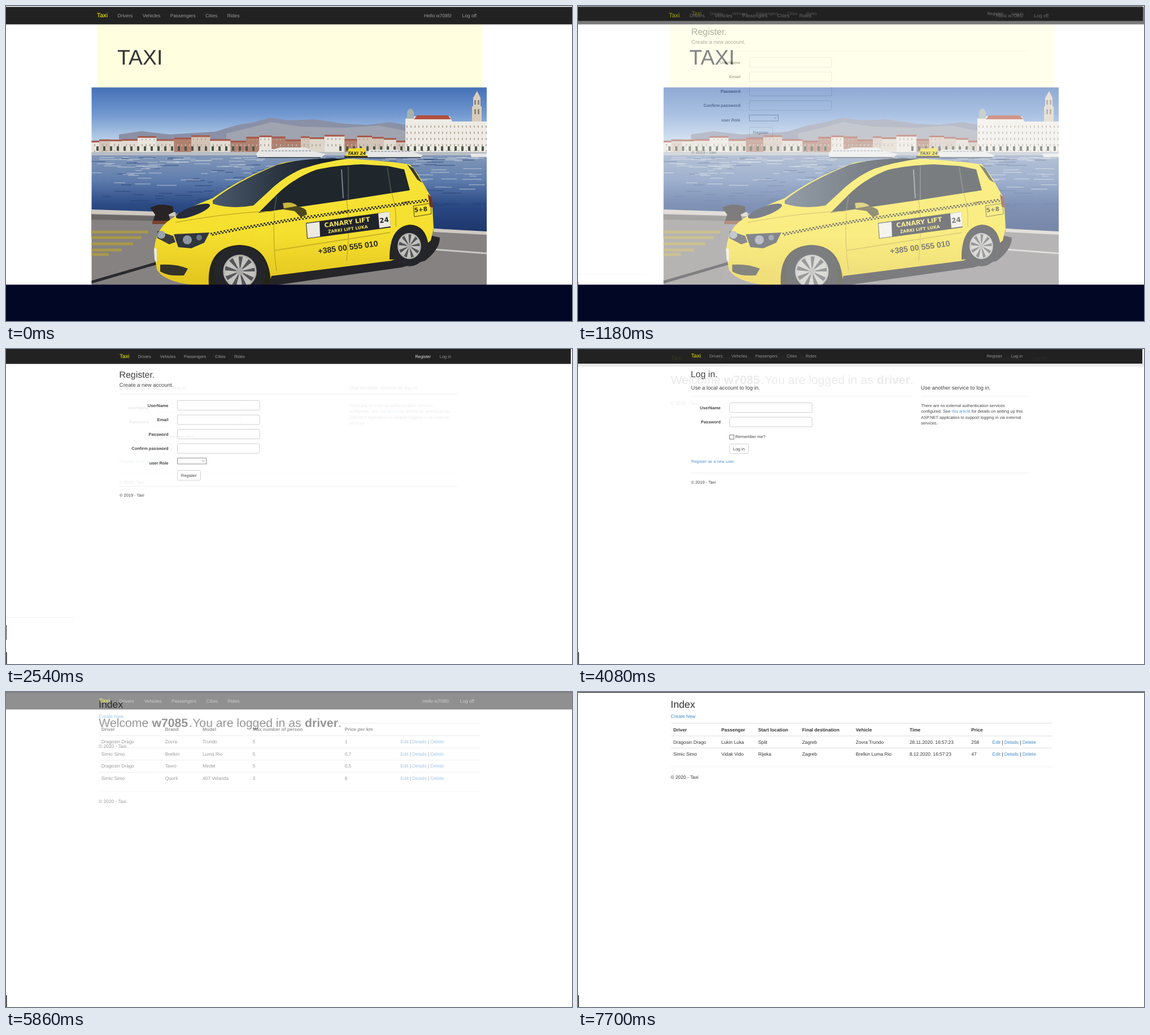
These frames come from a looping animation (1002x559 px, 8000 ms). An HTML page:

```html
<!DOCTYPE html>
<html lang="en">
<head>
<meta charset="utf-8">
<title>Taxi</title>
<style>
  html, body { margin: 0; width: 100%; height: 100%; overflow: hidden; background: #fff; }
  svg { display: block; width: 1002px; height: 559px; }
  text { font-family: "Liberation Sans", Arial, sans-serif; fill: #333; text-rendering: geometricPrecision; white-space: pre; }
  .b { font-weight: bold; }
  .r { text-anchor: end; }
  .brand { fill: #ff0; }
  .nav { fill: #9d9d9d; }
  .on { fill: #eee; }
  .link { fill: #428bca; }
  .sign text { font-family: "DejaVu Sans", sans-serif; font-weight: bold; }
  .field { fill: #fff; stroke: #ccc; }

  /* each page dissolves in over the one before, ten steps of 60 ms */
  .page, #band { animation: 8s -.5ms infinite; }
  #register { animation-name: register; }
  #login { animation-name: login; }
  #welcome { animation-name: welcome; }
  #vehicles { animation-name: vehicles; }
  #rides { animation-name: rides; }
  #band { animation-name: band; animation-timing-function: step-end; }
  @keyframes register { 0% { opacity: 0 } 12.5% { opacity: 0; animation-timing-function: steps(10, start) } 20%, 100% { opacity: 1 } }
  @keyframes login { 0% { opacity: 0 } 31.75% { opacity: 0; animation-timing-function: steps(10, start) } 39.25%, 100% { opacity: 1 } }
  @keyframes welcome { 0% { opacity: 0 } 51% { opacity: 0; animation-timing-function: steps(10, start) } 58.5%, 100% { opacity: 1 } }
  @keyframes vehicles { 0% { opacity: 0 } 70.25% { opacity: 0; animation-timing-function: steps(10, start) } 77.75%, 100% { opacity: 1 } }
  @keyframes rides { 0% { opacity: 0 } 89.5% { opacity: 0; animation-timing-function: steps(10, start) } 97%, 100% { opacity: 1 } }
  @keyframes band { 0% { opacity: 1 } 19.25%, 100% { opacity: 0 } }
</style>
</head>
<body>
<svg viewBox="0 0 1002 559">
  <defs>
    <linearGradient id="sky" x2="0" y2="1"><stop stop-color="#4570b6"/><stop offset=".4" stop-color="#7198d0"/><stop offset=".75" stop-color="#b3cbe6"/></linearGradient>
    <linearGradient id="sea" x2="0" y2="1"><stop stop-color="#8398b8"/><stop offset=".3" stop-color="#5f7dad"/><stop offset=".6" stop-color="#2c4a85"/><stop offset="1" stop-color="#1a3268"/></linearGradient>
    <linearGradient id="paint" x2="0" y2="1"><stop stop-color="#f7e43a"/><stop offset=".6" stop-color="#f5df2e"/><stop offset="1" stop-color="#e2c41e"/></linearGradient>
    <linearGradient id="glass"><stop stop-color="#4a5a6c"/><stop offset=".5" stop-color="#2a3440"/><stop offset="1" stop-color="#10161f"/></linearGradient>
    <pattern id="panes" width="7" height="11" patternUnits="userSpaceOnUse"><path d="M2 3h2v4h-2z" fill="#b5ada0"/></pattern>
    <clipPath id="frame"><path d="M151.500 144.500H851V495H151.500z"/></clipPath>
    <g id="wheel">
      <circle r="46" fill="#25262a"/>
      <circle r="30" fill="#55565a"/>
      <circle r="28" fill="none" stroke="#b3b2ad" stroke-width="3"/>
      <circle r="16" fill="none" stroke="#c3c2bd" stroke-width="22" stroke-dasharray="6.500 4.671"/>
      <circle r="7" fill="#a5a5a3"/>
    </g>
  </defs>

  <g id="home">
    <path d="M0 0H1002V559H0z" fill="#fff"/>
    <path d="M161 32H843.500V146H161z" fill="#ffffe0"/>
    <g id="homeText"></g>
    <g clip-path="url(#frame)">
      <path d="M151 144H851V265H151z" fill="url(#sky)"/>
      <path d="M200 228 240 222 290 228 370 223 410 211 440 206 468 198 500 203 545 201 600 209 640 211 680 206 720 213V250H200z" fill="#8a90a6"/>
      <path d="M390 226 440 214 470 206 520 214 600 216 660 212 710 222V245H390z" fill="#a0a4b0"/>
      <g id="town"></g>
      <path d="M707 200 722 196H786L790 205H851V263H707z" fill="#eeebe5"/>
      <path d="M708 206H851V258H708z" fill="url(#panes)"/>
      <path d="M722 201 728 194H782L788 201z" fill="#b2503f"/>
      <path d="M710 200V188Q716 176 722 188V200z" fill="#a4b3ad"/>
      <path d="M825 205V178H827V163L834 151 840 163V178H842V205z" fill="#d8cdbc"/>
      <path d="M829 167h3v8h-3zM835 167h3v8h-3zM829 183h3v9h-3zM835 183h3v9h-3z" fill="#8f8577"/>
      <path d="M151 259H851V266H151z" fill="#b9bec4"/>
      <path d="M160 253H440M590 253H850" stroke="#4c5548" stroke-width="8" stroke-dasharray="4 8"/>
      <path d="M151 265H851V410H151z" fill="url(#sea)"/>
      <g id="ripples"></g>
      <path d="M443 262 450 254H475L485 251H530L545 258 566 263 556 270H446zM636 263 645 255H690L722 259 738 265 732 270H638zM822 262H851V268H824z" fill="#e6e7e6"/>
      <path d="M452 257H540M646 258H715" stroke="#929aa2" stroke-width="1.500" stroke-dasharray="4 2"/>
      <path d="M446 269H557M638 269H734" stroke="#4d5866" stroke-width="2"/>

      <path d="M151 363 300 368 700 390 851 402V495H151z" fill="#858281"/>
      <path d="M151 361 300 366V373L151 369zM757 395 851 400V406L757 401z" fill="#cfc9c0"/>
      <path d="M151 370 290 374V382L151 379z" fill="#6b6867"/>
      <path d="M760 432 851 439" stroke="#c9c7c4" stroke-width="3"/>
      <path d="M151 401H252M151 411H240M151 422H225M151 433H205M151 441H182" stroke="#a9984a" stroke-width="5"/>
      <path d="M151 490 268 456" stroke="#2a2a30" stroke-width="5"/>
      <path d="M255 358Q273 348 296 356V366L288 370 292 386H259L264 370z" fill="#282425"/>
      <path d="M259 381H292V387H259z" fill="#7a432c"/>
      <path d="M455 495V470L690 440 742 405 768 411Q768 432 742 452L700 464 480 495z" fill="#252529"/>

      <path d="M267 468 262 436Q264 402 284 384 315 360 366 341 420 302 490 278 590 263 714 281 724 288 741 319L754 342 757 394 752 416 740 426 682 452 470 479 464 495H330Q280 489 267 468z" fill="url(#paint)"/>
      <path d="M366 345Q405 313 480 282 530 268 604 271 560 277 524 289 490 304 464 330L438 354Q400 361 366 351z" fill="url(#glass)"/>
      <path d="M447 367 478 336Q508 306 548 291 580 283 630 281L676 284 705 290 715 327 606 344 530 355z" fill="#1f262c"/>
      <path d="M594 290 597 341" stroke="#7b828a" stroke-width="2"/>
      <path d="M606 285V343M675 286 682 331M479 338 475 363" stroke="#454e48" stroke-width="2"/>
      <path d="M710 281 721 288 737 314 728 308z" fill="#39382e"/>
      <path d="M475 367Q472 425 479 470M603 344Q610 390 603 452M683 333Q692 360 690 392M300 384Q400 366 475 364" fill="none" stroke="#b09a20"/>
      <path d="M475 434 680 402" stroke="#cbb225" stroke-width="2"/>
      <path d="M490 357Q520 352 531 362L533 370 522 375 511 364 491 361z" fill="#4b4620"/>
      <path d="M490 350Q508 346 516 355L492 359z" fill="#c9b73a"/>
      <path d="M588 368 607 363M700 350 715 347" stroke="#8d7c1e" stroke-width="3"/>
      <ellipse cx="331" cy="364" rx="32" ry="8" transform="rotate(-20 331 364)" fill="#252b3c"/>
      <g fill="none" stroke="#29281f" stroke-width="2.500" stroke-dasharray="3">
        <path d="M362 404Q470 382 600 364T747 343"/>
        <path d="M362 407Q470 385 600 367T747 346" stroke-dashoffset="3"/>
      </g>
      <path d="M297 405 360 402 351 420 328 430 305 428z" fill="#30363e"/>
      <circle cx="321" cy="415" r="8" fill="#8e979f"/><circle cx="342" cy="411" r="5" fill="#6c7680"/>
      <path d="M268 399 296 408 300 419 289 423 268 412z" fill="#3b3c3c"/>
      <circle cx="275" cy="406" r="7" fill="#99a3ad"/>
      <path d="M273 459Q300 457 322 466L315 478Q286 480 273 471z" fill="#343329"/>
      <path d="M262 430 267 431 267 455 263 450z" fill="#e8e8e3"/>
      <path d="M747 334 754 340 756 358 750 356z" fill="#782e24"/>
      <path d="M359 495Q355 428 412 424 461 424 468 480V495zM679 450Q678 392 715 388 744 389 748 426L742 446z" fill="#252419"/>
      <use href="#wheel" transform="translate(414 471)"/>
      <use href="#wheel" transform="translate(714 426) scale(.7 .78)"/>

      <path d="M601 266 607 253 634 252 639 267z" fill="#f0d92a"/>
      <path d="M599 266H640V270H599z" fill="#39382c"/>
      <g class="sign">
        <path d="M531 385 679 365 681 393 533 413z" fill="#20232a"/>
        <path d="M532 386 555 383 556 409 534 412zM659 368 679 365 681 391 661 394z" fill="#eceae2"/>
        <g transform="translate(564 393) rotate(-7.500)">
          <text font-size="11.200" style="fill:#f3e25c">CANARY LIFT</text>
          <text x="5" y="11" font-size="7.500" style="fill:#f3e25c">ŽARKI LIFT LUKA</text>
          <text x="98" y="5" font-size="12" style="fill:#222">24</text>
        </g>
        <path d="M721 355 752 350 753 369 723 374z" fill="none" stroke="#4d451a"/>
        <text x="723" y="366" font-size="10.500" transform="rotate(-6 723 366)" style="fill:#2c2919">5+8</text>
        <text x="605" y="264" font-size="7.500" font-style="italic" style="fill:#222">TAXI 24</text>
      </g>
      <text class="b" transform="translate(553 440) rotate(-7.500)" font-size="14.200" style="fill:#29281f">+385 00 555 010</text>
    </g>
  </g>
  <g class="page" id="register"></g>
  <g class="page" id="login"></g>
  <g class="page" id="welcome"></g>
  <g class="page" id="vehicles"></g>
  <g class="page" id="rides"></g>
  <path id="band" d="M0 494.500H1002V559H0z" fill="#020725"/>
</svg>
<script>
  const put = (id, ...parts) => document.getElementById(id).innerHTML = parts.flat().join('');
  const text = (x, y, size, str, cls = '') => `<text x="${x}" y="${y}" font-size="${size}" class="${cls}">${str}</text>`;
  const box = (x, y, w, h, attrs) => `<rect x="${x}" y="${y}" width="${w}" height="${h}" ${attrs}/>`;
  const fill = (x, y, w, h, color) => box(x, y, w, h, `fill="${color}"`);
  const rule = (x, y, w, color = '#eee') => fill(x, y, w, 1, color);
  const field = (x, y, w, h) => box(x, y, w, h, 'rx="2" class="field"');
  const blank = fill(0, 0, 1002, 559, '#fff');
  const tick = fill(0, 538, 1.5, 21, '#222');

  const MENU = ['Drivers', 'Vehicles', 'Passengers', 'Cities', 'Rides'];
  const HELLO = 'Hello w7085!';
  const nav = (bar, base, size, brandX, xs, right) => [
    fill(0, ...bar, '#222'),
    text(brandX, base + .3, size * 18 / 14, 'Taxi', 'brand'),
    MENU.map((m, i) => text(xs[i], base, size, m, 'nav')),
    right.map(([x, str, cls = 'nav']) => text(x, base, size, str, cls))
  ].flat();

  // seeded noise for the waterfront
  let seed = 7;
  const rnd = () => (seed = seed * 16807 % 2147483647) / 2147483647;
  const town = [];
  for (let x = 151; x < 707;) {
    const w = 14 + rnd() * 24, top = 229 + rnd() * 12;
    town.push(fill(x, top, w, 262 - top, ['#ddd5c9', '#e9e4dc', '#d3c4b8', '#e2dcd3', '#b0806f'][rnd() * 5 | 0]),
      fill(x, top - 1, w, 3, '#a6594b'),
      fill(x + 2, top + 4, w - 4, 16, 'url(#panes)'));
    x += w;
  }
  put('town', town);
  const ripples = [];
  for (let i = 0; i < 240; i++) {
    const y = 268 + rnd() * rnd() * 110, pale = y < 325 && rnd() < .7;
    ripples.push(box(145 + rnd() * 690, y, 10 + rnd() * 28, 1.5, `fill="${pale ? '#cdd3da' : '#243f74'}" opacity=".55"`));
  }
  put('ripples', ripples);

  put('homeText',
    nav([1.5, 1002, 31.1], 19.5, 8.45, 160.8, [197.5, 241.8, 290.8, 353, 391.8], [[740, HELLO], [807.5, 'Log off']]),
    text(197, 104, 37.4, 'TAXI'));

  const S = 7.43, H2 = 15.9, H4 = 9.55;
  put('register', blank,
    nav([0, 1000, 26.5], 15.8, S, 201.3, [233.5, 272.8, 315, 370.2, 404], [[724.5, 'Register', 'on'], [767.8, 'Log in']]),
    text(200.5, 51, H2, 'Register.'),
    text(200.8, 67, H4, 'Create a new account.'),
    rule(201, 79.5, 598),
    ['UserName', 'Email', 'Password', 'Confirm password', 'user Role'].map((s, i) =>
      text(287.5, 102.5 + i * 25.5, S, s, 'b r') + (i < 4 ? field(303.5, 91.5 + i * 25.5, 145.5, 17) : '')),
    box(303.5, 193.5, 51, 10.5, 'fill="#fff" stroke="#888"'),
    '<path d="M347 197.500l2 2 2-2" fill="none" stroke="#555" stroke-width=".8"/>',
    field(303.5, 215.5, 41, 17.5),
    text(309.8, 227, S, 'Register'),
    rule(201, 243, 598),
    text(201, 262.3, S, '© 2019 - Taxi'),
    rule(0, 476, 121),
    fill(0, 490, 1, 26, '#222'), tick);

  put('login', blank,
    nav([0, 999, 26], 15, S, 200.3, [232.5, 271.8, 314, 369.2, 403], [[723.5, 'Register'], [766.8, 'Log in']]),
    text(199.5, 49.8, H2, 'Log in.'),
    text(200, 71.5, H4, 'Use a local account to log in.'),
    text(607, 71.5, H4, 'Use another service to log in.'),
    rule(200, 83.5, 392), rule(607, 83.5, 191),
    ['UserName', 'Password'].map((s, i) =>
      text(252.5, 106.5 + i * 25.5, S, s, 'b r') + field(268.5, 95.5 + i * 25.5, 146, 17)),
    box(268.5, 152.5, 7.5, 7.5, 'fill="#fff" stroke="#666"'),
    text(278.5, 157.7, S, 'Remember me?'),
    field(268.5, 168.5, 33.5, 17),
    text(274.8, 179.7, S, 'Log in'),
    text(200.3, 201.5, S, 'Register as a new user', 'link'),
    ['There are no external authentication services',
     'configured. See <tspan class="link">this article</tspan> for details on setting up this',
     'ASP.NET application to support logging in via external',
     'services.'].map((s, i) => text(607.3, 102.8 + i * 10.5, S, s)),
    rule(200, 219.5, 598),
    text(200.2, 238.7, S, '© 2019 - Taxi'), tick);

  const M = 8.3;
  put('welcome', blank,
    nav([1, 1002, 30], 19, M, 164.8, [200.5, 244.8, 293, 354.5, 392.5], [[737, HELLO], [803.8, 'Log off']]),
    text(164.3, 62, 21.2, 'Welcome <tspan class="b" x="258.500">w7085</tspan><tspan x="324.300">.You are logged in as </tspan><tspan class="b" x="529">driver</tspan>.'),
    text(164.3, 98.8, M, '© 2020 - Taxi'), tick);

  const link = s => `<tspan class="link">${s}</tspan>`;
  const actions = ['Edit', 'Details', 'Delete'].map(link).join(' | ');
  const table = (id, y, pitch, cols, heads, rows, endY) => put(id, blank,
    fill(0, 0, 1002, 1.2, '#222'),
    text(164, 28, 17.7, 'Index'),
    text(164.3, 46.3, M, 'Create New', 'link'),
    rule(164.5, 54.8, 674, '#ddd'),
    heads.map((h, i) => text(cols[i], y, M, h, 'b')),
    rows.map((row, r) => rule(164.5, y + 8 + r * pitch, 674, '#ddd') +
      [...row, actions].map((c, i) => text(cols[i], y + 22 + r * pitch, M, c)).join('')),
    rule(164.5, endY - 21.2, 674),
    text(164.3, endY, M, '© 2020 - Taxi'), tick);

  const D1 = 'Dragosin Drago', D2 = 'Simic Simo';
  table('vehicles', 69, 21.7, [168.8, 281.7, 348, 436.4, 599.7, 698.3],
    ['Driver', 'Brand', 'Model', 'Max number of person', 'Price per km'],
    [[D1, 'Zovra', 'Trundo', 5, 1],
     [D2, 'Brelkin', 'Luma Rio', 5, '0,7'],
     [D1, 'Tavro', 'Mirdel', 5, '0,5'],
     [D2, 'Quorli', '407 Velanda', 3, 8]], 197);
  table('rides', 69.5, 21.5, [168.8, 253.8, 319, 396.8, 491.7, 587, 696.3, 733.6],
    ['Driver', 'Passenger', 'Start location', 'Final destination', 'Vehicle', 'Time', 'Price'],
    [[D1, 'Lukin Luka', 'Split', 'Zagreb', 'Zovra Trundo', '28.11.2020. 16:57:23', 258],
     [D2, 'Vidak Vido', 'Rijeka', 'Zagreb', 'Brelkin Luma Rio', '8.12.2020. 16:57:23', 47]], 153.5);
</script>
</body>
</html>
```
